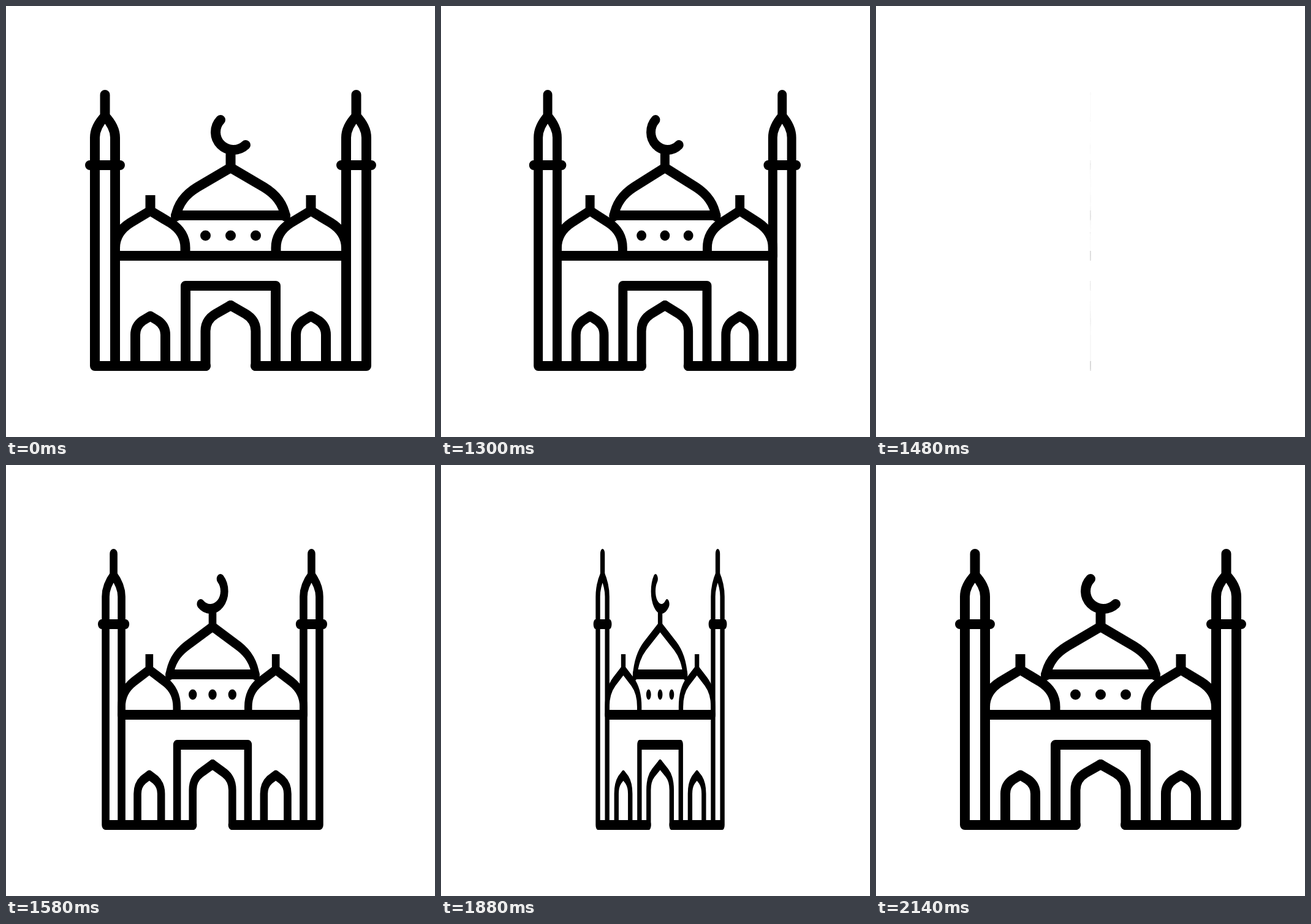
Write an HTML page that moves like this. It is 700 px wide and 704 px high and loops after 2980 ms.

```html
<!DOCTYPE html>
<html lang="en">
<head>
<meta charset="utf-8">
<title>Turning mosque icon</title>
<style>
  html, body { margin: 0; width: 100%; height: 100%; overflow: hidden; background: #fff; }
  svg { display: block; width: 100%; height: 100%; }
  .line { fill: none; stroke: #000; stroke-width: 16; stroke-linecap: round; stroke-linejoin: round; }
  .flat { stroke-linecap: butt; }
</style>
</head>
<body>
<svg viewBox="0 0 700 704">
  <g id="mosque" class="line">
    <g id="half">
      <!-- minaret and base -->
      <path d="M326 588H145V215C145 201 152 190 161.5 180C171 190 178 201 178 215V588"/>
      <path d="M161.5 145V180M137 260H186"/>
      <!-- side dome -->
      <path d="M178 408V395C178 377 187 364 203 354L235.5 334.5L268 354C284 364 292.5 377 292.5 395V408"/>
      <path class="flat" d="M235.5 309V336"/>
      <!-- side window -->
      <path d="M211 588V537C211 526 216 519 223 514L235.5 506.5L248 514C255 519 260 526 260 537V588"/>
      <!-- gate -->
      <path d="M293 588V457H366.5"/>
      <path d="M325.5 588V531C325.5 518 332 509 342 503L366.5 489"/>
      <!-- main dome -->
      <path d="M277 344C281 321 294 307 312 296L366.5 264"/>
      <circle cx="325.5" cy="375" r="8.5" fill="#000" stroke="none"/>
    </g>
    <use href="#half" transform="translate(733) scale(-1 1)"/>
    <path d="M178 408H555M277 342H456"/>
    <path class="flat" d="M366.5 236V266"/>
    <path d="M350 186A29 29 0 0 0 391 227"/>
    <circle cx="366.5" cy="375" r="8.5" fill="#000" stroke="none"/>
  </g>
</svg>
<script>
  const LOOP = 2980, STEP = 20, MIDDLE = 1650, HALF_TURN = 506;
  const mosque = document.getElementById('mosque');

  // One full turn about the vertical axis, sine eased, facing backwards at MIDDLE.
  function turnScale(time) {
    const away = Math.max(0, Math.abs(time - MIDDLE) - 1.4);
    const progress = Math.max(0, 1 - away / HALF_TURN);
    return Math.cos(Math.PI * (1 - Math.cos(progress * Math.PI / 2)));
  }

  function draw(now) {
    const time = Math.floor((now % LOOP) / STEP) * STEP;
    const scale = turnScale(time).toFixed(4);
    mosque.setAttribute('transform', `translate(350) scale(${scale} 1) translate(-350)`);
    requestAnimationFrame(draw);
  }

  const start = performance.now();
  draw(0);
  function tick() { return performance.now() - start; }
  window.requestAnimationFrame = (raf => fn => raf.call(window, () => fn(tick())))(window.requestAnimationFrame);
</script>
</body>
</html>
```
